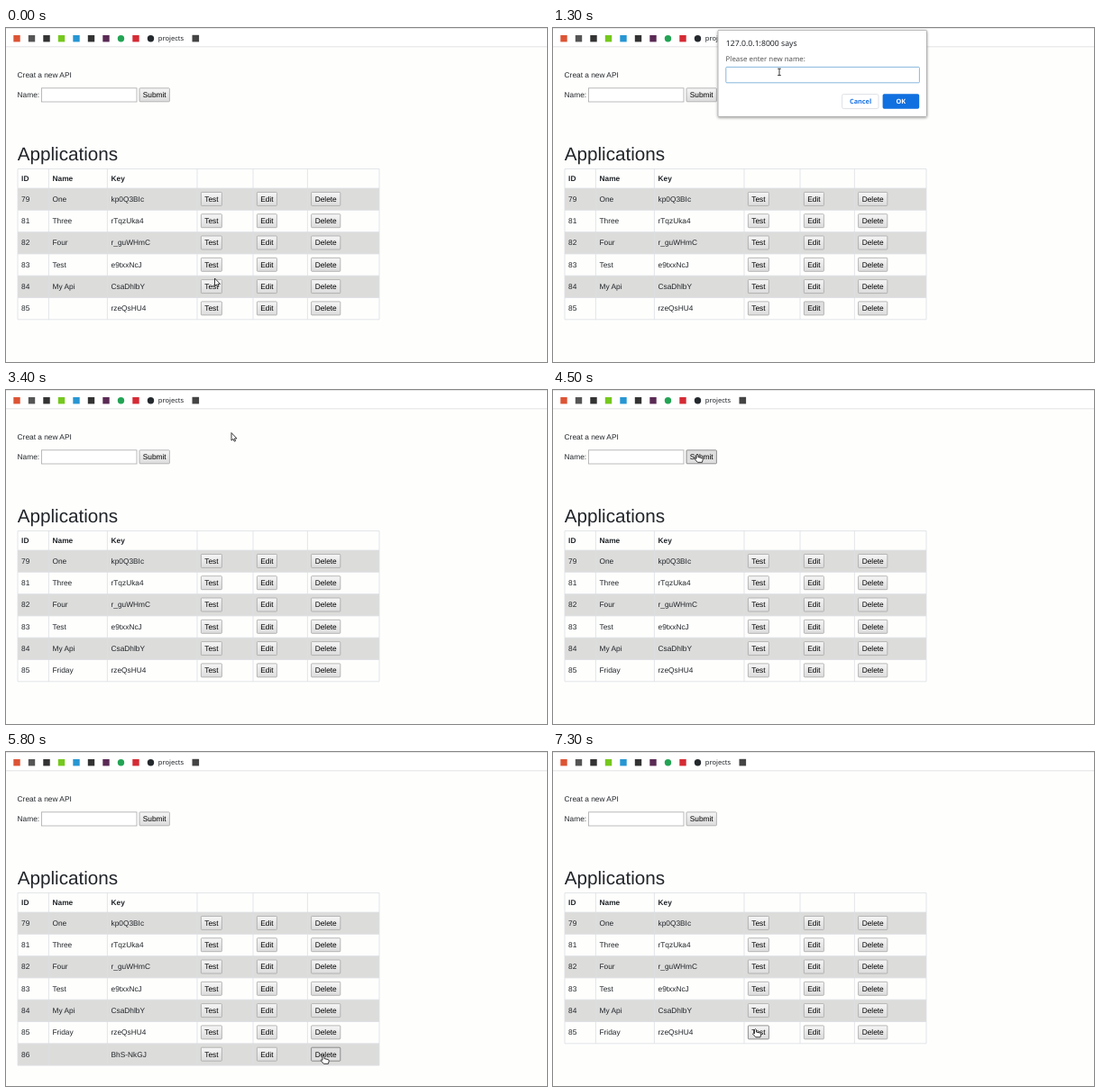
An HTML page that plays this animation: 600x371 px, repeating every 8 s.

```html
<!DOCTYPE html>
<html lang="en">
<head>
<meta charset="utf-8">
<title>Applications</title>
<style>
html, body { margin: 0; height: 100%; overflow: hidden; background: #fefefd; }
svg { display: block; width: 600px; height: 371px; }
text { font: 8.33px "Liberation Sans", Arial, sans-serif; fill: #212529; text-rendering: geometricPrecision; white-space: pre; }
.ui { font-family: "Noto Sans", "Open Sans", sans-serif; }
.mid { text-anchor: middle; }
.bold { font-weight: bold; }
</style>
</head>
<body>
<svg id="stage" viewBox="0 0 600 371"></svg>
<script>
const LOOP = 8000, STEP = 100;
const stage = document.getElementById('stage');
const columns = [13, 47.4, 112.4, 212, 274, 334.4, 414];
const left = columns[0], right = columns[6];
const headTop = 156.5, rowsTop = 178, rowHeight = 24.3;

// Pointer moves: start, end, x, y
const moves = [
  [100, 600, 287, 309],
  [900, 1300, 250, 47.5],
  [3900, 4300, 160, 71],
  [4500, 4800, 242, 130.5],
  [4800, 5600, 352, 337],
  [6000, 6300, 333, 337.5],
  [6300, 7300, 224.5, 307.5]
];

const pointers = {
  arrow: 'M0 0V8.6L2 6.9 3.3 9.6 4.6 9 3.4 6.4H6Z',
  hand: 'M-1 1Q0 -.6 1 1V3.6L5 4.5Q6.5 5 6.2 6.4L5.4 9.3H.4L-3 5.6Q-2.4 4.3 -1 5.3Z',
  beam: 'M-.8 -2.3H2.8M1 -2.3V5.1M-.8 5.1H2.8'
};

const rect = (x, y, w, h, fill, stroke = 'none', r = 0, extra = '') =>
  `<rect x="${x}" y="${y}" width="${w}" height="${h}" rx="${r}" fill="${fill}" stroke="${stroke}" stroke-width=".8" ${extra}/>`;
const text = (x, y, s, cls = '', style = '') =>
  `<text x="${x}" y="${y}" class="${cls}" style="${style}">${s}</text>`;
const line = (x1, y1, x2, y2, color = '#dcdfe2') =>
  `<path d="M${x1} ${y1}L${x2} ${y2}" stroke="${color}" stroke-width=".8"/>`;

function pointerAt(t) {
  let x = 231.5, y = 278;
  for (const [start, end, toX, toY] of moves) {
    const k = Math.min(1, Math.max(0, (t - start) / (end - start)));
    const ease = k * k * (3 - 2 * k);
    x += (toX - x) * ease;
    y += (toY - y) * ease;
  }
  return { x, y };
}

function toolbar() {
  const colors = ['#dc5435', '#555', '#333', '#76c81e', '#2796d3', '#333', '#5a2a55', '#23a455', '#d52b35', '#24292e'];
  const icons = colors.map((c, i) => rect(8.3 + i * 16.5, 8, 7.4, 7.4, c, 'none', i === 7 || i === 9 ? 3.7 : 0));
  return rect(0, 0, 600, 20.5, '#fff') + line(0, .4, 600, .4, '#dedede') + line(0, 20.8, 600, 20.8, '#dcdcdc') +
    icons.join('') + text(168.8, 14.2, 'projects', 'ui', 'font-size:7.55px') + rect(206.5, 7.8, 7.6, 7.6, '#444');
}

function dialog(t) {
  const typed = 'Friday'.slice(0, Math.max(0, 2 * Math.floor((t - 2300) / 200) + 1));
  const caret = t < 1900 ? '' : '<tspan dx="-1.6">|</tspan>';
  return rect(183, 2.4, 231.5, 96, '#fff', '#a4a4a4', 1, 'filter="url(#shadow)"') +
    text(191.8, 20, '127.0.0.1:8000 says', 'ui', 'font-size:8.7px') +
    text(191.6, 36.6, 'Please enter new name:', 'ui', 'font-size:7.87px;fill:#555') +
    rect(191.8, 43.4, 214.6, 17.4, '#fff', '#69a5d5', 1) +
    text(195.8, 54.6, typed + caret, 'ui', 'font-size:7.5px') +
    rect(320.6, 73.6, 40.4, 16, '#fff', '#d5d9df', 1.8) +
    rect(365.6, 73.2, 40.6, 16.6, '#1070e0', 'none', 1.8) +
    text(341.1, 84.2, 'Cancel', 'ui mid bold', 'font-size:7.3px;fill:#1a73e8') +
    text(385.8, 84.2, 'OK', 'ui mid bold', 'font-size:7.3px;fill:#fff');
}

function render(t) {
  const open = t >= 900 && t < 3200;
  const { x, y } = pointerAt(t);
  let shape = open && t >= 1300 && t < 3100 ? 'beam' : 'arrow';

  const button = (bx, by, w, label, pressed) => {
    const hover = !open && x > bx && x < bx + w && y > by && y < by + 15;
    if (hover) shape = 'hand';
    return rect(bx, by, w, 15, pressed ? '#dfdfdf' : 'url(#face)', hover ? '#777' : '#a6a6a6', .8) +
      text(bx + w / 2, by + 10.4, label, 'mid', 'fill:#000');
  };

  const rows = [
    [79, 'One', 'kp0Q3BIc'], [81, 'Three', 'rTqzUka4'], [82, 'Four', 'r_guWHmC'],
    [83, 'Test', 'e9txxNcJ'], [84, 'My Api', 'CsaDhlbY'],
    [85, t < 3300 ? '' : 'Friday', 'rzeQsHU4']
  ];
  if (t >= 4600 && t < 6300) rows.push([86, '', 'BhS-NkGJ']);
  const bottom = rowsTop + rows.length * rowHeight;
  const rowTop = i => rowsTop + i * rowHeight;
  const cells = (values, base, cls) => values.map((v, i) => text(columns[i] + 4.1, base, v, cls)).join('');

  let out = `<defs>
    <linearGradient id="face" x2="0" y2="1"><stop stop-color="#f6f6f6"/><stop offset="1" stop-color="#dcdcdc"/></linearGradient>
    <filter id="shadow" x="-5%" y="-10%" width="110%" height="125%"><feDropShadow dx="0" dy="1" stdDeviation="1.4" flood-opacity=".4"/></filter>
  </defs>` + toolbar() +
    text(12.6, 54.6, 'Creat a new API') + text(12.6, 76.8, 'Name:') +
    rect(39.4, 66.8, 105.6, 15.2, '#fff', '#aaa') +
    button(148, 66.8, 33.4, 'Submit', t === 4500) +
    text(12.8, 147, 'Applications', '', 'font-size:20.65px') +
    cells(['ID', 'Name', 'Key'], 170.2, 'bold');

  rows.forEach((row, i) => {
    const top = rowTop(i);
    if (i % 2 === 0) out += rect(left, top, right - left, rowHeight, '#dcdcdb');
    out += line(left, top, right, top) + cells(row, top + 14.8);
  });
  out += line(left, headTop, right, headTop) + line(left, bottom, right, bottom) +
    columns.map(c => line(c, headTop, c, bottom)).join('');
  rows.forEach((row, i) => {
    const by = rowTop(i) + 4.4;
    out += button(216.4, by, 23, 'Test') +
      button(278.4, by, 22, 'Edit', row[0] === 85 && t >= 800 && t < 3100) +
      button(338.6, by, 32.2, 'Delete', row[0] === 86 && t >= 5800);
  });

  if (open) out += dialog(t);
  const fill = shape === 'beam' ? 'none' : '#fff';
  out += `<path transform="translate(${x} ${y})" d="${pointers[shape]}" fill="${fill}" stroke="#222" stroke-width=".9" stroke-linejoin="round"/>`;
  stage.innerHTML = out;
}

let shown = -1;
function tick() {
  const t = Math.floor(performance.now() % LOOP / STEP) * STEP;
  if (t !== shown) render(shown = t);
  requestAnimationFrame(tick);
}
tick();
</script>
</body>
</html>
```
